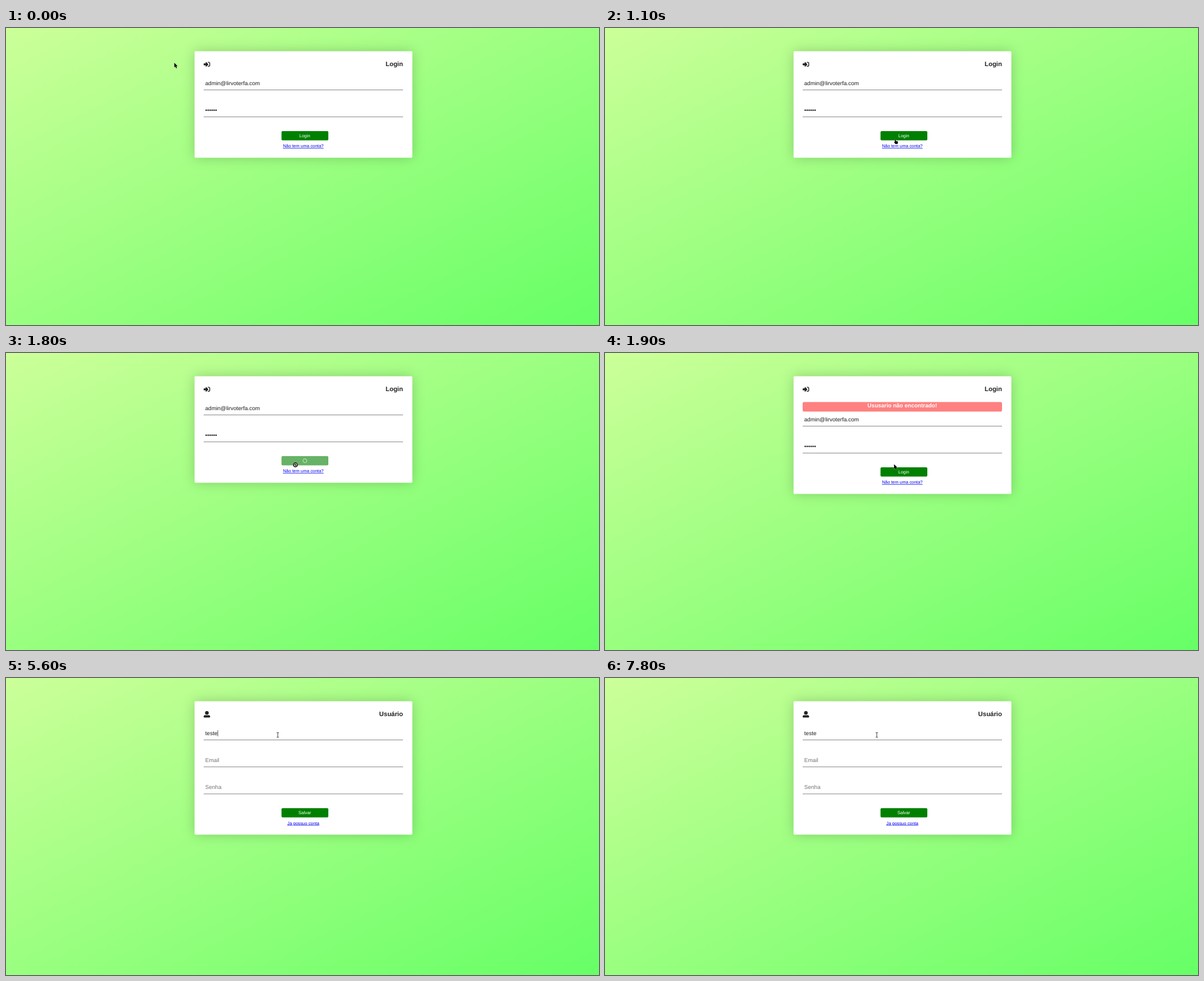
An HTML page for the animation above (8000 ms loop, 1056 by 530 pixels).

```html
<!DOCTYPE html>
<html lang="pt">
<head>
<meta charset="utf-8">
<title>Login</title>
<style>
  html, body { margin: 0; width: 100%; height: 100%; overflow: hidden; }
  body { background: linear-gradient(to bottom right, #cf9, #6f6); }
  svg { display: block; width: 1056px; height: 530px; }
  text { font: 10px "Liberation Sans", Arial, sans-serif; fill: #1f1f1f; text-rendering: geometricPrecision; white-space: pre; }
  .title { font-size: 11.4px; font-weight: bold; text-anchor: end; fill: #212121; }
  .alert { font-weight: bold; text-anchor: middle; fill: #fff; }
  .label { font-size: 8px; text-anchor: middle; fill: #fff; }
  .link { font-size: 7.8px; text-anchor: middle; fill: #00e; text-decoration: underline; }
  .hint { fill: #757575; }
  .icon { fill: #212121; stroke: #212121; }
  #card { fill: #fff; filter: drop-shadow(0 0 11px rgba(0, 0, 0, .2)); }
  #pointer path { stroke-linejoin: round; }
</style>
</head>
<body>
<svg id="stage" viewBox="0 0 1056 530"></svg>
<script>
const LOOP = 8000;
const FIELD_GAP = 48.2;

// Pointer stops: time, x, y
const stops = [
  [0, 299.7, 62], [500, 316, 72], [600, 360, 99], [700, 421, 138],
  [800, 476, 170], [900, 507, 188], [1000, 518.5, 196], [1100, 514.7, 198.4],
  [2400, 516, 212], [2500, 517.6, 225.4], [5600, 484, 101.6]
];

// Caret changes: time, field index (-1 hides it)
const carets = [[0, -1], [5600, 0], [6100, 1], [6700, -1], [7200, 1], [7800, -1]];

const field = (i, text, cls = "") =>
  `<text class="${cls}" x="354.8" y="${102 + i * FIELD_GAP}">${text}</text>
   <rect x="352" y="${110 + i * FIELD_GAP}" width="355" height=".9" fill="#777"/>`;

const button = (y, text, id) =>
  `<rect id="${id}Box" x="490.6" y="${y}" width="83.4" height="16.5" rx="2" fill="green"/>
   <text id="${id}Text" class="label" x="532" y="${y + 11}">${text}</text>`;

const link = (y, text) => `<text class="link" x="529.4" y="${y}">${text}</text>`;

const icon = shapes => `<g class="icon" transform="translate(352 59) scale(.0224)">${shapes}</g>`;

const dots = Array.from({ length: 8 }, (_, i) => {
  const a = i * Math.PI / 4;
  return `<circle cx="${3.4 * Math.cos(a)}" cy="${3.4 * Math.sin(a)}" r=".75"/>`;
}).join("");

const outline = `fill="#000" stroke="#fff" stroke-width=".6" paint-order="stroke"`;
const shapes = {
  arrow: `<path ${outline} d="M0 0V8.6L1.9 6.8 3.2 9.9 4.7 9.3 3.4 6.2H6Z"/>`,
  hand: `<path ${outline} d="M1.3 .7Q2.1-.3 2.8 .7V3.2L6.2 3.9Q7.2 4.2 7 5.2L6.3 8.5H2.4L.2 5.6Q.1 4.6 1.3 5Z"/>`,
  beam: `<path fill="none" stroke="#fff" stroke-width="1.6" d="M-1.8-4H1.8M0-4V4M-1.8 4H1.8"/>
         <path fill="none" stroke="#222" stroke-width=".9" d="M-2-4.2H-.4L0-3.8.4-4.2H2M0-3.8V3.8M-2 4.2H-.4L0 3.8.4 4.2H2"/>`,
  blocked: `<g transform="translate(.7 1.1)"><circle r="4.9" fill="#fff" opacity=".6"/><circle r="4.4" fill="#111"/>
         <circle r="2.4" fill="none" stroke="#fff" stroke-width=".9"/>
         <path stroke="#fff" stroke-width=".9" d="M-1.7 1.7L1.7-1.7"/></g>`
};

document.getElementById("stage").innerHTML = `
  <rect id="card" x="335.8" y="41.5" width="387.8" height="190" rx="1.8"/>
  <g id="login">
    ${icon(`<path stroke-width="48" stroke-linejoin="round" d="M24 216H184V98L347 264 184 430V312H24Z"/>
      <path fill="none" stroke-width="64" d="M325 96H416a64 64 0 0 1 64 64V352a64 64 0 0 1-64 64H325"/>`)}
    <text class="title" x="707" y="68.3">Login</text>
    <g id="alert">
      <rect x="352" y="87.5" width="355" height="17" rx="2.8" fill="#ff8080"/>
      <text class="alert" x="529.3" y="96.6">Ususario não encontrado!</text>
    </g>
    <g id="form">
      ${field(0, "admin@lirvoterfa.com")}
      ${field(1, "••••••")}
      ${button(184, "Login", "enter")}
      <g id="spinner" fill="#fff">${dots}</g>
      ${link(213.3, "Não tem uma conta?")}
    </g>
  </g>
  <g id="signup">
    ${icon(`<g stroke="none"><circle cx="256" cy="144" r="144"/>
      <path d="M128 320Q256 352 384 320A128 128 0 0 1 512 448V464a48 48 0 0 1-48 48H48a48 48 0 0 1-48-48V448A128 128 0 0 1 128 320Z"/></g>`)}
    <text class="title" x="707" y="68.3">Usuário</text>
    ${field(0, "teste")}
    ${field(1, "Email", "hint")}
    ${field(2, "Senha", "hint")}
    ${button(232.2, "Salvar", "save")}
    ${link(261.5, "Ja possuo conta")}
    <rect id="caret" width=".8" height="10.8" fill="#222"/>
  </g>
  <g id="pointer">${Object.entries(shapes).map(([k, s]) => `<g id="${k}">${s}</g>`).join("")}</g>`;

const el = id => document.getElementById(id);
const show = (id, on) => el(id).setAttribute("display", on ? "inline" : "none");
const set = (id, name, value) => el(id).setAttribute(name, value);
const latest = (table, t) => table.findLast(row => row[0] <= t);

function pointerKind(x, y, shift, busy) {
  const inside = (l, r, top, bottom) => x >= l && x <= r && y >= top + shift && y <= bottom + shift;
  if (inside(490, 574, 184, 200.5)) return busy ? "blocked" : "hand";
  if (inside(352, 707, 88, 111) || inside(352, 707, 136, 159)) return "beam";
  return "arrow";
}

function draw(t) {
  const signup = t >= 5600;
  const failed = t >= 1900 && !signup;
  const busy = t >= 1700 && t < 1900;
  const shift = failed ? 20 : 0;

  show("login", !signup);
  show("signup", signup);
  show("alert", failed);
  set("form", "transform", `translate(0 ${shift})`);
  set("card", "height", signup ? 238 : 190 + shift);

  show("enterText", !busy);
  show("spinner", busy);
  set("enterBox", "fill", busy ? "#66b266" : "green");
  const turn = Math.floor((t - 1700) / 100) * 18;
  set("spinner", "transform", `translate(532.3 192.2) rotate(${turn})`);

  const spot = latest(carets, t)[1];
  show("caret", spot >= 0);
  set("caret", "x", spot === 0 ? 376.7 : 355);
  set("caret", "y", 93.2 + Math.max(spot, 0) * FIELD_GAP);

  const [, x, y] = latest(stops, t);
  const kind = pointerKind(x, y, shift, busy);
  for (const k in shapes) show(k, k === kind);
  set("pointer", "transform", `translate(${x} ${y})`);
}

const start = performance.now();
function tick() {
  draw((performance.now() - start) % LOOP);
  requestAnimationFrame(tick);
}
tick();
</script>
</body>
</html>
```
